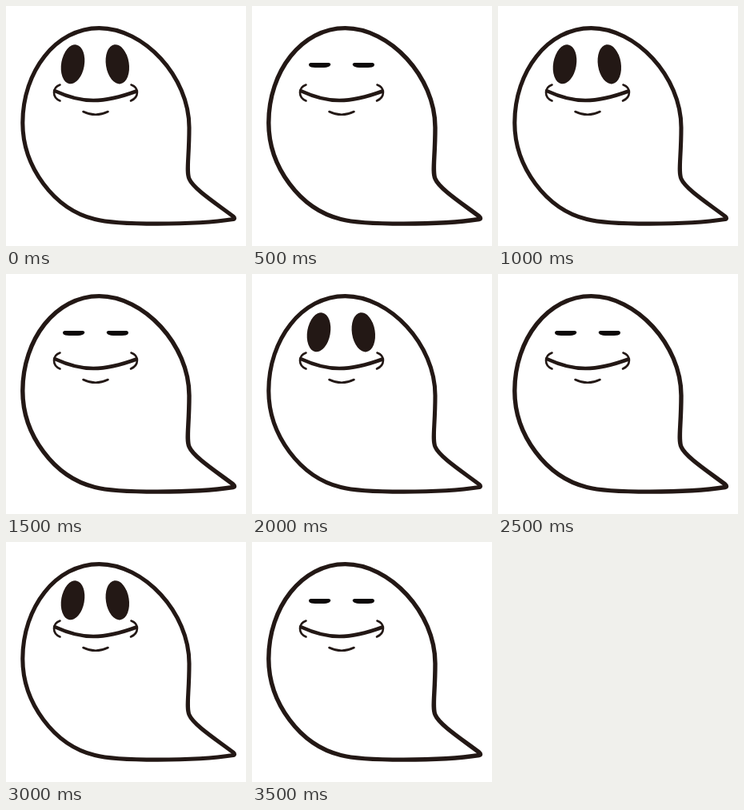
An HTML page for the animation above (4000 ms loop, 300x300 px).

```html
<!DOCTYPE html>
<html lang="en">
<head>
<meta charset="utf-8">
<title>Blinking ghost</title>
<style>
html, body { margin: 0; width: 100%; height: 100%; overflow: hidden; background: #fff; }
svg { display: block; width: 100vw; height: 100vh; }
.line { fill: none; stroke: #231815; stroke-linecap: round; stroke-linejoin: round; }
</style>
</head>
<body>
<svg viewBox="0 0 300 300">
  <path id="body" class="line" d="M116.5 27.6
    C62 27.6 20.8 82 20.8 146
    C20.8 201 60 254 111 266.5
    C138 274 236 274 284 266.5
    Q287 265.5 284 263
    C260 245 234 228 229 216
    C225 207 229 190 229 152
    C229 88 172 27.6 116.5 27.6Z"/>
  <path class="line" stroke-width="4.6" d="M62 106.5 C95 121.800 121 122 163 106.5"/>
  <path class="line" stroke-width="2.6" d="M67.5 98.5 C57.5 102 57.5 114.500 67.5 118.5 M156.5 98.5 C166.5 102 166.5 114 156 118.5"/>
  <path class="line" stroke-width="2.6" d="M96.5 132 Q112 139.600 127.5 132"/>
  <g id="open" fill="#231815">
    <ellipse cx="83.5" cy="72.8" rx="14.4" ry="24.8" transform="rotate(10 83.5 72.8)"/>
    <ellipse cx="139.3" cy="72.8" rx="14.4" ry="24.8" transform="rotate(-9 139.3 72.8)"/>
  </g>
  <g id="shut" fill="#0c0808">
    <path id="lid" d="M73.5 71 H96 Q99 71.5 98 74 Q96.500 76.500 90 77 H79 Q73 76.800 71.500 75 Q70 71.500 73.5 71Z"/>
    <use href="#lid" transform="translate(224 0) scale(-1 1)"/>
  </g>
</svg>
<script>
const BLINK = 500, LOOP = 4000;
const el = id => document.getElementById(id);
const show = (id, on) => el(id).setAttribute("visibility", on ? "visible" : "hidden");

function draw(time) {
  const closed = Math.floor((time % LOOP) / BLINK) % 2 === 1;
  show("open", !closed);
  show("shut", closed);
  el("body").setAttribute("stroke-width", closed ? 5.4 : 5.1);
}

const start = performance.now();
function tick() {
  draw(performance.now() - start);
  requestAnimationFrame(tick);
}
tick();
</script>
</body>
</html>
```
